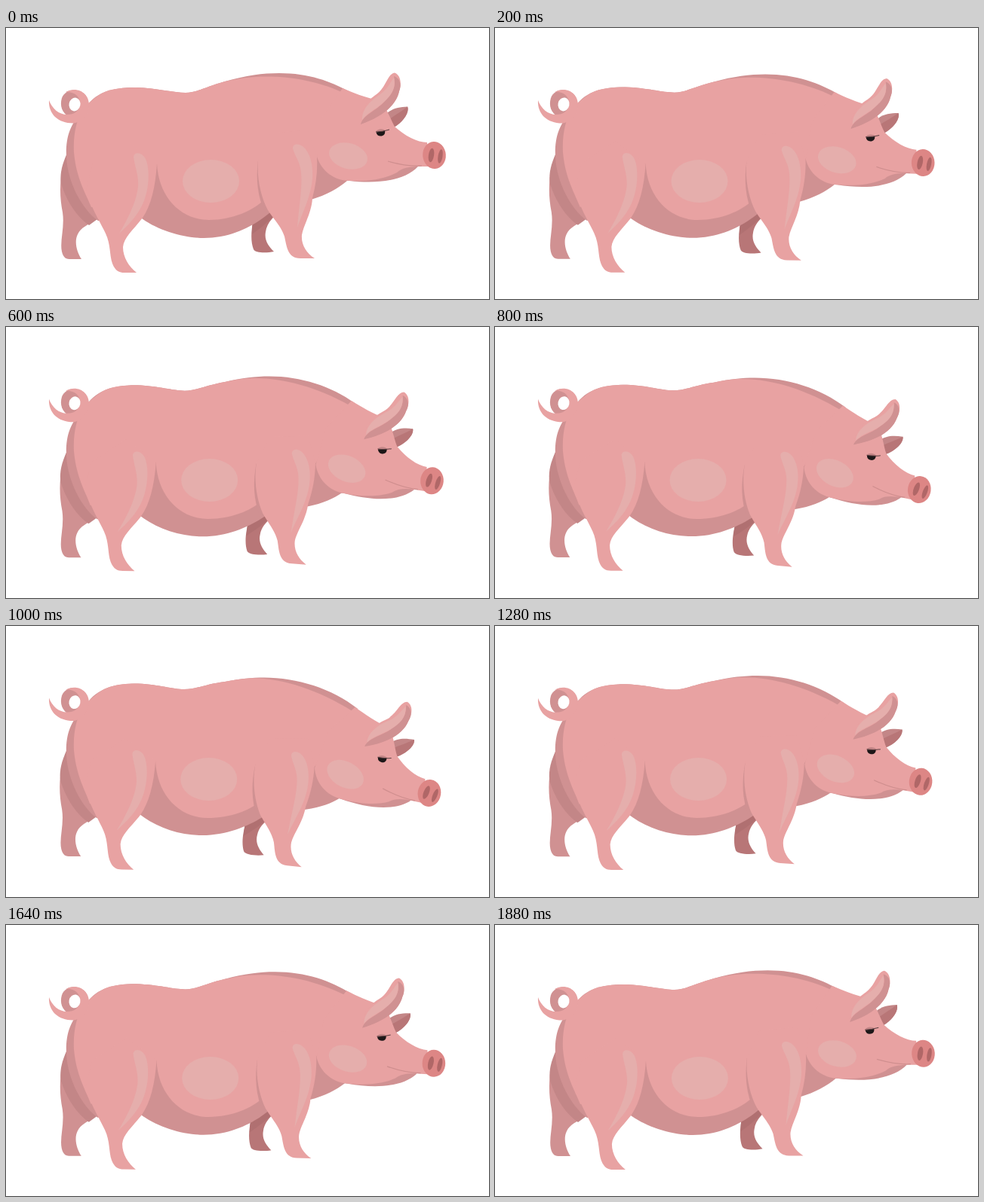
Write an HTML page that moves like this. It is 640 by 360 pixels and loops after 1920 ms.

```html
<!DOCTYPE html>
<html lang="en">
<head>
<meta charset="utf-8">
<title>Pig</title>
<style>
  html, body { margin: 0; width: 100%; height: 100%; overflow: hidden; background: #fff; }
  svg { display: block; width: 100vw; height: 100vh; }
  .skin { fill: #e8a2a2; }
  .shade { fill: #d09192; }
  .deep { fill: #c38687; }
  .far { fill: #b87677; }
  .glow { fill: #e5aeac; }
  .snout { fill: #dd8685; }
  .nostril { fill: #b06767; }
</style>
</head>
<body>
<svg viewBox="0 0 640 360">
  <g id="farRear">
    <path class="shade" d="M84 160C72 185 69 215 75 245C78 265 71 283 74 297C76 306 80 307 86 307H100C94 298 90 284 95 274C99 265 108 262 120 254L125 200Z"/>
    <path class="deep" d="M84 160C74 180 71 194 73 207C81 232 95 252 110 262L121 254L125 200Z"/>
  </g>
  <g id="farFront">
    <path class="far" d="M330 245C324 268 324 284 328 294C330 299 345 299 355 297C348 290 342 282 344 271C345 262 351 254 358 248L352 225Z"/>
    <path fill="#b07071" d="M330 245C326 256 326 266 326 274C337 266 347 258 354 250L352 225Z"/>
  </g>
  <path id="silhouette" class="shade"/>
  <path id="torso" class="skin"/>
  <ellipse id="belly" class="glow" cy="203.5" rx="37.5" ry="28.5"/>

  <g id="tail">
    <path class="shade" d="M106 90C96 79 79 80 74 93C71 103 74 113 84 118L98 112Z"/>
    <path class="skin" d="M57 96C56 115 70 127 90 126.500C98 125 108 118 110 104C111 86 94 77 79 85C90 84 99 91 98 101C97 111 90 115 81 115C70 115 61 107 57 96Z"/>
    <ellipse cx="91" cy="101.5" rx="7.5" ry="9" fill="#fff" transform="rotate(12 91 101.5)"/>
  </g>

  <g id="nearRear">
    <path class="skin" d="M106 215C113 240 125 258 132 273C139 288 137 302 141 313C145 323 150 325 157 325H173C163 317 155 305 155 291C156 278 170 267 181 252C192 236 198 212 200 180L160 150L115 180Z"/>
    <path class="glow" d="M169 171C171 163 181 166 185 174C190 185 190 206 185 223C179 245 164 260 150 273C159 257 172 235 175 211C176 195 171 186 169 171Z"/>
  </g>
  <g id="nearFront">
    <path class="shade" d="M334 176C331 200 333 225 344 247L352 240Z"/>
    <path class="skin" d="M334 176C332 200 338 225 347 242C354 253 365 264 369 277C372 290 373 306 390 306H409C398 299 391 288 392 275C394 262 405 246 406 226C411 207 413 190 412 171L400 135L350 140Z"/>
    <path class="glow" d="M380 160C380 152 391 153 397 161C404 170 407 184 406 200C404 224 394 242 386 265C388 238 393 212 391 192C390 178 383 171 380 160Z"/>
  </g>

  <g id="head">
    <path class="deep" d="M502 116C510 107 520 105 532 104.500C535 112 526 125 514 132Z"/>
    <path class="far" d="M507 122C515 116 524 111 532 104.500C535 112 526 125 514 132Z"/>
    <path class="shade" d="M412 171C420 190 435 203 455 203C490 207 527 204 546 184L500 170Z"/>
    <path class="skin" d="M446 80C460 86 475 92 496 97C505 106 509 121 515 131C528 143 545 152 558 152L560 184H548C535 184 524 186 518 192C505 199 485 204 456 203C435 203 418 190 412 171L418 120Z"/>
    <path d="M506 177C520 181 535 184 551 183" fill="none" stroke="#cf8e8e" stroke-width="1.2"/>
    <ellipse class="glow" cx="453.5" cy="170" rx="26" ry="17" transform="rotate(15 453.5 170)"/>
    <path class="deep" d="M490 138C492 134 499 133 503 136.500L497 140Z"/>
    <path fill="#1d1718" d="M490.500 138.500L502 136.500C503 141 500 143.500 496.500 143.500C493 143.500 491 141.500 490.500 138.500Z"/>
    <path d="M490 138Q499 138 508 135" fill="none" stroke="#5a3e40"/>
    <ellipse class="snout" cx="567.5" cy="169" rx="15.3" ry="18" transform="rotate(-4 567.5 169)"/>
    <ellipse class="nostril" cx="563.5" cy="169" rx="3.6" ry="9.3" transform="rotate(9 563.5 169)"/>
    <ellipse class="nostril" cx="575.5" cy="170.5" rx="3" ry="9.3" transform="rotate(9 575.5 170.5)"/>
    <g id="ear">
      <path class="skin" d="M470 128C468 108 478 97 491 88C504 79 505 61 515 59.500C522 62 525 72 521 84C517 104 496 119 470 128Z"/>
      <path class="shade" d="M514 64C521 66 525 74 521 84C517 104 496 119 470 128C473 115 491 110 501 98C513 86 517 78 514 64Z"/>
      <path class="glow" d="M472 122C471 110 480 99 493 90C506 82 509 72 514 66C517 80 511 89 500 99C490 108 478 113 472 122Z"/>
    </g>
  </g>
</svg>
<script>
const LOOP = 1920, STEP = 40;
const parts = Object.fromEntries([...document.querySelectorAll('[id]')].map(e => [e.id, e]));

// Matching outlines with the head raised and lowered.
const outlines = {
  silhouette: [
    'M104 108C117 86 139 79 172 79C202 80 222 86 238 86C252 86 265 78 290 71C318 63 340 60 362 60C402 60 430 71 454 84L452 203C440 213 425 222 404 228L350 245C330 262 300 279 262 279C235 279 200 268 180 253L122 256C100 240 82 205 80 172C79 148 83 128 104 108Z',
    'M104 108C117 85 140 76 175 76.5C205 78 220 84 236 84C252 84 265 77 290 74C310 70 325 68.5 342 68.5C385 68.5 432 83 466 110L442 229C432 235 418 241 397 244L346 250C325 264 295 278 260 278C230 278 200 268 177 250L120 255C100 240 82 205 80 172C79 148 83 128 104 108Z'
  ],
  torso: [
    'M104 104C114 97 122 87 137 82.5C148 80 160 79 172 79C202 80 222 86 238 86C252 86 265 78 290 71C300 69 308 67 318 66C352 62 402 65 447 86L412 171L350 200L341 229C328 242 300 255 269 255C232 255 202 225 200 180L150 235L113 238C106 220 93 200 90 165C89 145 92 122 104 104Z',
    'M104 104C114 97 122 86 137 81C150 77 162 76.5 175 76.5C205 78 220 84 236 84C252 84 265 77 290 74C300 72 311 70 322 69.5C362 68 412 84 460 114L409 187L345 205L337 233C322 245 298 255 267 255C230 255 200 225 198 179L150 233L111 236C106 220 93 200 90 165C89 145 92 122 104 104Z'
  ]
};
const numberPattern = /\d+(\.\d+)?/g;
const mix = (a, b, k) => a + (b - a) * k;

function blend([up, down], k) {
  const ends = down.match(numberPattern);
  let i = 0;
  return up.replace(numberPattern, n => mix(+n, +ends[i++], k).toFixed(2));
}

// A mostly even swing, softened at both ends.
function lowering(t) {
  const half = 1 - Math.abs(2 * t / LOOP - 1);
  return mix(half, (1 - Math.cos(Math.PI * half)) / 2, 0.25) / 0.98;
}

const move = (part, value) => part.setAttribute('transform', value);

function render(t) {
  const k = lowering(t);
  for (const name in outlines) parts[name].setAttribute('d', blend(outlines[name], k));
  parts.belly.setAttribute('cx', mix(271.5, 268.7, k));
  move(parts.farRear, `translate(${-0.8 * k} ${-k})`);
  move(parts.nearRear, `translate(${-1.7 * k} ${-1.2 * k}) rotate(${0.8 * k} 180 170)`);
  move(parts.farFront, `rotate(${5 * k} 263 146)`);
  move(parts.nearFront, `rotate(${6 * k} 263 146)`);
  move(parts.head, `rotate(${13.2 * k} 332.5 166.7)`);
  move(parts.ear, `rotate(${-2.6 * k} 471 127)`);
  move(parts.tail, `translate(0 ${-0.4 * k})`);
}

const start = performance.now();
function frame() {
  const t = (performance.now() - start) % LOOP;
  render(Math.floor(t / STEP) * STEP);
  requestAnimationFrame(frame);
}
frame();
</script>
</body>
</html>
```
